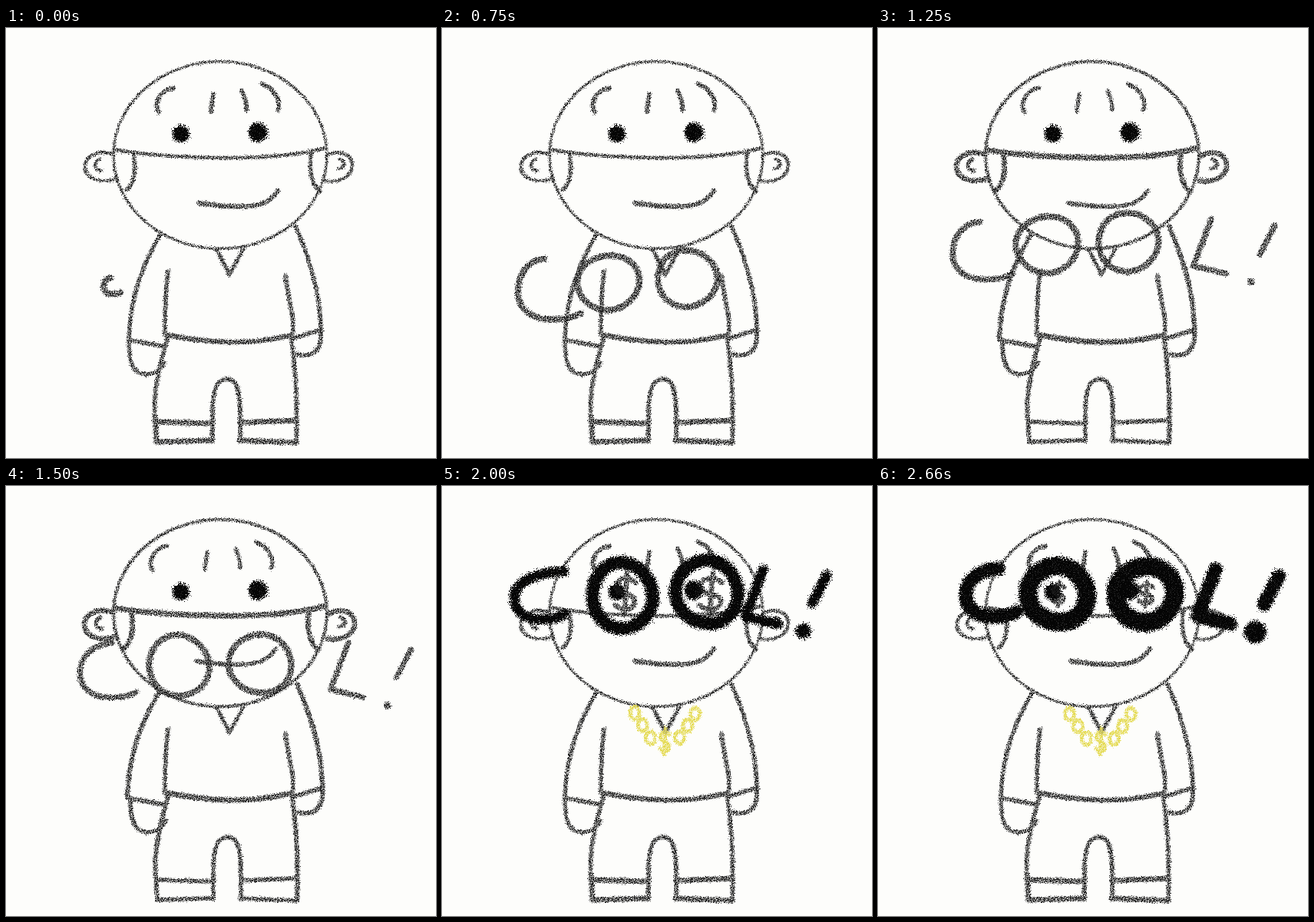
Write an HTML page that moves like this. It is 560x560 px and loops after 10000 ms.

```html
<!DOCTYPE html>
<html lang="en">
<head>
<meta charset="utf-8">
<title>Cool!</title>
<style>
html, body { margin: 0; width: 100%; height: 100%; overflow: hidden; background: #fdfdfb; }
svg { display: block; width: 100%; height: 100%; fill: none; stroke: #000; stroke-linecap: round; stroke-linejoin: round; }
</style>
</head>
<body>
<svg viewBox="0 0 560 560">
  <defs></defs>
  <g id="calm" filter="url(#pencil)"></g>
  <g id="bold" filter="url(#pencil)"></g>
  <g id="eyes" filter="url(#marker)"></g>
  <g id="chain" filter="url(#gold)"></g>
  <g id="cash" filter="url(#pencil)"></g>
  <g id="word"></g>
</svg>
<script>
const LOOP = 10000, LAST = 32;
const $ = id => document.getElementById(id);
const clamp = v => Math.max(0, Math.min(1, v));
const mix = (a, b, u) => a + (b - a) * u;
const wobble = n => (Math.abs(Math.sin(n * 12.9898) * 43758.5453) % 1) * 2 - 1;
const line = (d, w) => `<path d="${d}" stroke-width="${w}"/>`;
const dot = (x, y, r) => `<circle cx="${x}" cy="${y}" r="${r}" fill="#000" stroke="none"/>`;

// Grainy drawing tool: ragged edge, then paper grain knocked out of the stroke.
const tool = (id, color, rough, grain, body) => `
<filter id="${id}" filterUnits="userSpaceOnUse" x="0" y="0" width="560" height="560" color-interpolation-filters="sRGB">
  <feTurbulence type="fractalNoise" baseFrequency=".73" numOctaves="2" seed="4" result="noise"/>
  <feDisplacementMap in="SourceGraphic" in2="noise" scale="${rough}" xChannelSelector="R" yChannelSelector="G"/>
  <feGaussianBlur stdDeviation=".4" result="ragged"/>
  <feColorMatrix in="noise" values="0 0 0 0 0  0 0 0 0 0  0 0 0 0 0  0 0 0 3 -1" result="paper"/>
  <feComposite in="ragged" in2="paper" operator="arithmetic" k1="${grain}" k2="${body}" result="mask"/>
  <feFlood flood-color="${color}"/>
  <feComposite in2="mask" operator="in"/>
</filter>`;

document.querySelector('defs').innerHTML =
  tool('pencil', '#181818', 6, 1.15, .14) +
  tool('gold', '#e3d94c', 6, 1.1, .25) +
  tool('marker', '#050505', 14, .8, .85);

// Path, weight in the calm pose, weight in the bold pose, sideways shift in the bold pose.
const parts = [
  ['M140 165.5A139 122 0 1 1 418 165.5A139 122 0 1 1 140 165.5', 3.4, 4, 0],
  ['M143 159Q200 168 280 169T414 157', 4.4, 7, 0],
  ['M141 165C125 158 103 164 103 181C103 197 125 203 145 196', 4.2, 6.5, -1],
  ['M417 167C430 158 450 162 451 178C451 195 432 202 416 199', 4.2, 6.5, 3],
  ['M122 171C114 173 114 186 124 186M435 171C443 173 442 183 433 183', 4.2, 5, 1],
  ['M166 163C170 185 167 202 157 211M398 162C393 185 399 205 409 213', 5, 6.5, -3],
  ['M218 78C203 80 191 96 199 110M270 86L267 109M307 82Q314 96 313 107M333 73C350 78 358 95 354 107', 5.8, 5, -8],
  ['M251 228Q290 234 320 232Q345 228 354 212', 6, 5.5, -3],
  ['M202 267C180 305 162 345 160 405M160 406Q185 411 208 415', 5.4, 6, -2],
  ['M160 408C160 435 165 450 182 451Q200 450 206 436', 5.4, 5.5, 2],
  ['M377 258C395 300 410 345 410 395M371 405L411 393M410 395C412 420 398 430 380 425', 5.5, 6, 2],
  ['M211 317C207 345 207 375 207 397M364 323C367 350 375 375 374 395', 5.6, 5.5, 0],
  ['M207 399Q250 408 290 409T372 400', 6.5, 7, 0],
  ['M274 288L291 321L310 286', 5.5, 5, 0],
  ['M211 400C200 440 191 475 194 508M371 400C377 440 380 480 378 540', 5.4, 6, 1],
  ['M269 538L269 500C269 470 275 457 288 457C302 457 304 475 305 500L305 538', 5.6, 5.5, 1],
  ['M194 507L196 539L268 537M195 513L267 515M305 514L376 511M304 537L378 540', 7, 5.5, 1]
];
$('calm').innerHTML = parts.map(([d, w]) => line(d, w)).join('');
$('bold').innerHTML = parts.map(([d, , w, dx]) => `<g transform="translate(${dx})">${line(d, w)}</g>`).join('');
$('eyes').innerHTML = dot(228, 138, 11) + dot(328, 136, 12.5);

// Places a unit-sized path, centred on its own box.
const fit = (d, x, y, w, h) => d.replace(/(-?[\d.]+) (-?[\d.]+)/g,
  (_, px, py) => `${(x + px * w).toFixed(1)} ${(y + py * h).toFixed(1)}`);
const dollar = 'M.5 -.34C.1 -.6 -.5 -.45 -.45 -.2C-.4 .05 .5 -.05 .45 .22C.4 .5 -.2 .5 -.5 .32M.08 -.62L-.04 .6';

function letterC(x, y, size, w, tip) {
  const d = `M${tip - .5} -.5C${tip * .4 - .5} -.48 -.5 -.25 -.5 .05C-.5 .35 -.25 .5 0 .5Q.3 .52 .5 .4`;
  return line(fit(d, x, y, size, size * .96), w);
}

function ring(x, y, rx, ry, w, phase) {
  let d = '';
  for (let i = 0; i < 40; i++) {
    const a = i * Math.PI / 20, r = 1 + .025 * Math.sin(2 * a + phase) + .015 * Math.sin(3 * a - phase);
    d += `${i ? 'L' : 'M'}${(x + rx * r * Math.cos(a)).toFixed(1)} ${(y + ry * r * Math.sin(a)).toFixed(1)}`;
  }
  return line(d + 'Z', w);
}

const letterL = (x, y, size, w) => line(fit('M.05 -.5L-.5 .36L.5 .5', x, y, size * .6, size), w);

const bang = (x, y, size, w, r) =>
  line(fit('M.5 -.5L-.12 0', x, y, size * .42, size), w) + dot(x - size * .21, y + size * .5, r);

// The word pops in letter by letter, climbs to the eyes, then gets fatter.
function drawWord(k) {
  const rise = clamp((k - 12) / 12), fat = clamp((k - 24) / 8);
  const y = mix(330, 141, rise), sway = Math.cos(k * Math.PI / 6);
  const w = 8 + 9 * clamp(2 * rise - 1) + 7 * fat, thin = w * mix(1, .75, rise);
  const rx = 40 - 2 * fat, ry = mix(36, 42, rise) - 5 * fat;
  const lens = [mix(215, 234, rise), mix(319, 345, rise) + 3 * fat];
  const tip = mix(.42, 1, rise * rise) - .35 * fat;
  const letters = [
    s => letterC(mix(140, 125, rise) + 22 * fat, y + 8 * (1 - rise) - 2 * fat, mix(82, 65, rise) * s, thin, tip),
    s => ring(lens[0], y, rx * s, ry * s, w, k),
    s => ring(lens[1], y - 4 * (1 - fat), rx * s, ry * s, w, k + 2),
    s => letterL(430 - 15 * sway, y + 3, 71 * s, thin),
    s => bang(500 - 13 * sway, y + 13, 73 * s, thin, w * .6)
  ];
  $('word').innerHTML = letters.map((letter, i) => {
    const born = i * 3.2, drift = 2 * (1 - fat);
    if (k < born) return '';
    const dx = drift * wobble(k + i * 7), dy = drift * wobble(k * 3 + i);
    return `<g transform="translate(${dx.toFixed(1)} ${dy.toFixed(1)})">${letter(clamp((k - born + .8) / 3))}</g>`;
  }).join('');
  $('word').setAttribute('filter', `url(#${k > 20 ? 'marker' : 'pencil'})`);

  const h = mix(44, 26, fat), bright = k > 20;
  $('cash').innerHTML = bright
    ? lens.map((x, i) => line(fit(dollar, x + mix(5, 1, fat), y, h * .6 + i * 3, h), 6.5 - fat)).join('') : '';
}

// Links hang in a V from the collar, joined by a pendant.
function drawChain(k) {
  let out = '';
  for (let i = 0; i < 6 && k >= 19 + i * .8; i++) {
    const step = i < 3 ? i - 3 : i - 2, far = Math.abs(step);
    const x = 289.5 + Math.sign(step) * (7 + 11 * far), y = 345 - 16 * far;
    const drift = k < LAST ? 2 : 0;
    out += ring(x + drift * wobble(k + i), y + drift * wobble(k * 2 + i), 6, 8, 5, k + i);
  }
  if (k >= 23) out += line(fit(dollar, 290, 333, 12, 28), 5);
  $('chain').innerHTML = out;
}

let shown = -1;
function draw(ms) {
  const t = Math.floor(ms % LOOP / 10) * 10;
  const k = Math.min(LAST, Math.ceil((t + 10) * 3 / 250) - 1); // twelve drawings a second
  if (k === shown) return;
  shown = k;
  const calm = k % 4 < 2;
  $('calm').style.display = calm ? '' : 'none';
  $('bold').style.display = calm ? 'none' : '';
  drawChain(k);
  drawWord(k);
}

const start = performance.now();
function tick() {
  draw(performance.now() - start);
  requestAnimationFrame(tick);
}
tick();
</script>
</body>
</html>
```
